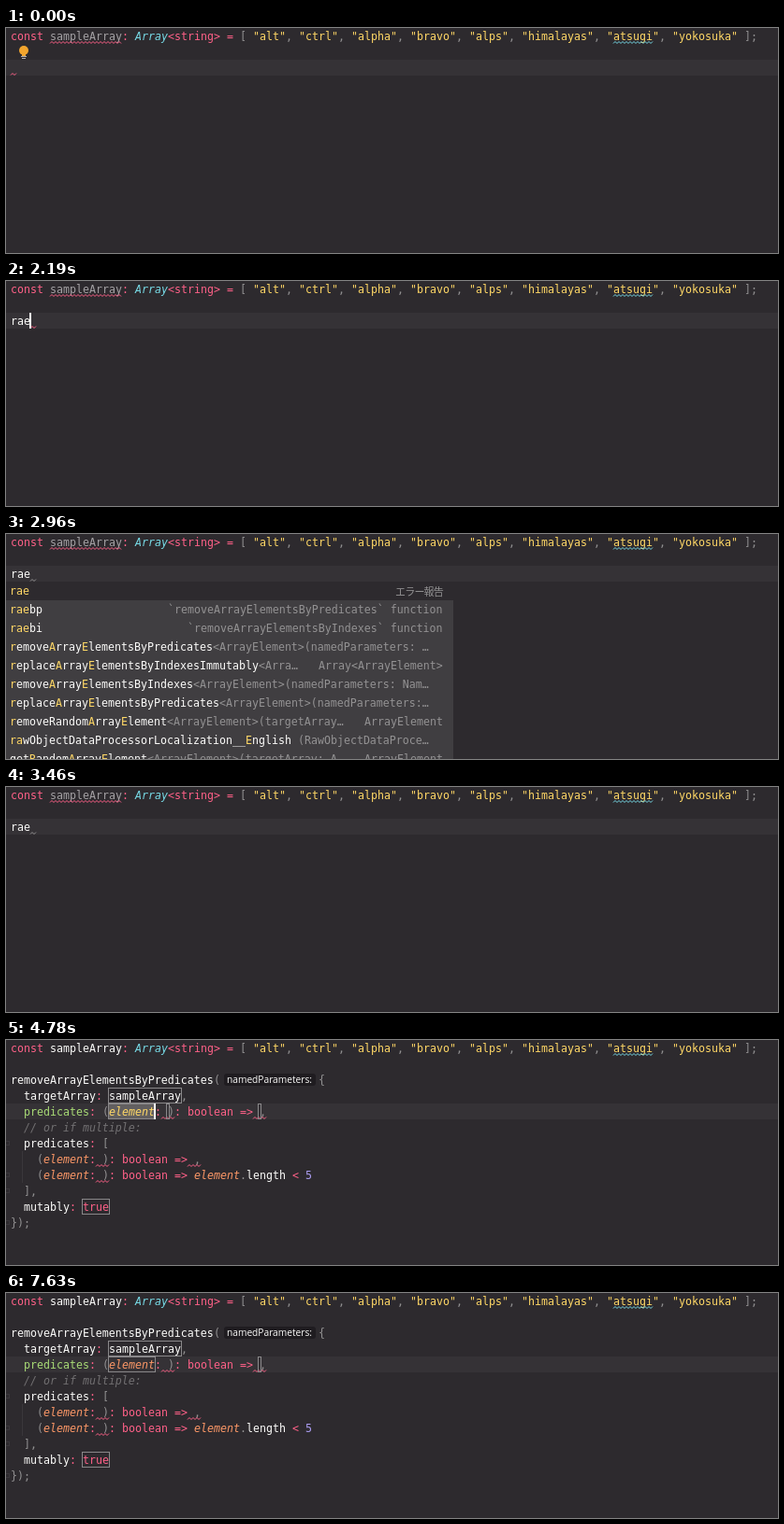
Recreate the animation shown at these times as an HTML page with a canvas. Size 825 px wide and 241 px high, loop 8 s.

```html
<!DOCTYPE html>
<html lang="en">
<head>
<meta charset="utf-8">
<title>Editor template expansion</title>
<style>
  html, body { margin: 0; width: 100%; height: 100%; overflow: hidden; background: #2d2a2e; }
  canvas { display: block; width: 825px; height: 241px; }
</style>
</head>
<body>
<canvas id="stage" width="825" height="241"></canvas>
<script>
const ctx = document.getElementById('stage').getContext('2d');
const W = 825, H = 241, LOOP = 8000;
const LEFT = 5, CELL = 7, LINE = 17, ROW = 20, POPUP_TOP = 51, POPUP_W = 478;
const MONO = '11.627px "DejaVu Sans Mono", monospace';
const UI = '"Open Sans", "Noto Sans", sans-serif';

const C = {
  bg: '#2d2a2e', line: '#353236', popup: '#403e41', select: '#625f60', box: '#8a888a', guide: '#3a373b',
  w: '#fcfcfa', g: '#939293', d: '#727072', u: '#a5a2a5', p: '#ff6188',
  c: '#78dce8', y: '#ffd866', o: '#fc9867', s: '#ffd866', n: '#a9dc76', v: '#ab9df2'
};
const ITALIC = 'cods';

const colX = col => LEFT + col * CELL;
const lineY = n => (n - 1) * LINE;

function rect(x, y, w, h, color) {
  ctx.fillStyle = color;
  ctx.fillRect(x, y, w, h);
}

function frame(x, y, w, h) {
  ctx.strokeStyle = C.box;
  ctx.lineWidth = 1;
  ctx.strokeRect(x + 0.5, y + 0.5, w - 1, h - 1);
}

function label(text, x, y, color, font, align = 'left') {
  ctx.font = font;
  ctx.fillStyle = color;
  ctx.textAlign = align;
  ctx.fillText(text, x, y);
}

// Runs are pairs: style key, text. Returns the x after the last run.
function runs(x, y, ...parts) {
  for (let i = 0; i < parts.length; i += 2) {
    const key = parts[i], text = parts[i + 1];
    label(text, x, y, C[key], (ITALIC.includes(key) ? 'italic ' : '') + MONO);
    x += text.length * CELL;
  }
  return x;
}

const code = (n, col, ...parts) => runs(colX(col), lineY(n) + 13, ...parts);

function wave(n, col, len, color) {
  const x0 = colX(col), y0 = lineY(n) + 16.5;
  ctx.beginPath();
  for (let x = 0; x <= len * CELL; x += 2) ctx.lineTo(x0 + x, y0 - (x % 4 ? 2 : 0));
  ctx.strokeStyle = color;
  ctx.lineWidth = 1;
  ctx.stroke();
}

function caret(n, col) {
  rect(Math.max(LEFT, colX(col) - 1), lineY(n), 2, LINE, C.w);
}

function declaration(t) {
  code(1, 0, 'p', 'const ', t < 3950 ? 'u' : 'w', 'sampleArray', 'p', ': ', 'c', 'Array', 'p', '<string> = ', 'g', '[ ');
  const words = ['alt', 'ctrl', 'alpha', 'bravo', 'alps', 'himalayas', 'atsugi', 'yokosuka'];
  let x = colX(37);
  words.forEach((word, i) => {
    x = runs(x, 13, 'y', `"${word}"`, 'g', i < words.length - 1 ? ', ' : ' ];');
  });
  if (t < 4270) wave(1, 6, 11, C.p);
  wave(1, 92, 6, C.c);
}

function bulb() {
  ctx.fillStyle = '#f2a52e';
  ctx.beginPath();
  ctx.arc(19, 24, 5, 0, Math.PI * 2);
  ctx.fill();
  rect(17, 27, 4, 3, '#f2a52e');
  rect(16, 30, 6, 1, '#b5b3b5');
  rect(17, 32, 4, 1, '#b5b3b5');
}

const args = '<ArrayElement>(';
// name, tail, right-hand note, matched letters
const ITEMS = [
  ['rae', '', '', 'rae'],
  ['raebp', '', '`removeArrayElementsByPredicates` function', 'rae'],
  ['raebi', '', '`removeArrayElementsByIndexes` function', 'rae'],
  ['removeArrayElementsByPredicates', args + 'namedParameters: …', '', 'rAE'],
  ['replaceArrayElementsByIndexesImmutably', '<Arra…', 'Array<ArrayElement>', 'rAE'],
  ['removeArrayElementsByIndexes', args + 'namedParameters: Nam…', '', 'rAE'],
  ['replaceArrayElementsByPredicates', args + 'namedParameters:…', '', 'rAE'],
  ['removeRandomArrayElement', args + 'targetArray…', 'ArrayElement', 'rAE'],
  ['rawObjectDataProcessorLocalization__English', ' (RawObjectDataProce…', '', 'raE'],
  ['getRandomArrayElement', args + 'targetArray: A…', 'ArrayElement', 'RAE']
];

function item([name, tail, note, match], y) {
  let x = 4, hit = 0;
  for (const ch of name) {
    const matched = ch === match[hit];
    if (matched) hit++;
    x = runs(x, y, matched ? 'y' : 'w', ch);
  }
  runs(x, y, 'g', tail);
  if (note) runs(467 - note.length * CELL, y, 'g', note);
}

function footer(top) {
  const y = top + 16;
  label('Press Ctrl+. to choose the selected (or first) suggestion and insert a dot afterwards', 344, y, C.y, '9.5px ' + UI, 'right');
  label('Next Tip', 350, y, C.y, '9.5px ' + UI);
  ctx.lineWidth = 1.6;
  for (let i = 0; i < 8; i++) {
    const a = i * Math.PI / 4, cos = Math.cos(a), sin = Math.sin(a);
    ctx.strokeStyle = `rgba(190,188,190,${0.25 + i * 0.06})`;
    ctx.beginPath();
    ctx.moveTo(450 + cos * 3, top + 12 + sin * 3);
    ctx.lineTo(450 + cos * 6.5, top + 12 + sin * 6.5);
    ctx.stroke();
  }
  for (const dy of [6, 11, 16]) rect(467, top + dy, 3, 3, '#c1c0c0');
}

function popup(t) {
  const full = t >= 2540;
  const count = full ? ITEMS.length : 4;
  const selected = t < 3140 ? 0 : 1;
  const bottom = POPUP_TOP + count * ROW;
  rect(0, POPUP_TOP, POPUP_W, full ? H - POPUP_TOP : count * ROW + 23, C.popup);
  rect(0, POPUP_TOP + selected * ROW, POPUP_W, ROW, C.bg);
  for (let i = 0; i < count; i++) item(ITEMS[i], POPUP_TOP + i * ROW + 14);
  ctx.letterSpacing = full ? '-0.8px' : '0px';
  label('エラー報告', 467, 66, C.g, `${full ? 11 : 12}px "Noto Sans CJK JP", "Noto Sans CJK", sans-serif`, 'right');
  ctx.letterSpacing = '0px';
  if (!full) footer(bottom);
}

function typing(t) {
  const typed = 'rae'.slice(0, t < 1920 ? 0 : t < 2060 ? 1 : t < 2190 ? 2 : 3);
  rect(0, lineY(3), W, LINE, C.line);
  code(3, 0, 'w', typed);
  wave(3, typed.length, 1, t < 2260 ? C.p : C.g);
  if (t < 940) bulb();
  else if (t < 2960 || t >= 3530) caret(3, typed.length);
  if (t >= 2330 && t < 3460) popup(t);
}

function lambda(n, col, style, ...tail) {
  code(n, col, 'g', '(', style, 'element', 'p', ': ', 'g', ')', 'p', ': boolean => ', ...tail);
}

function hint() {
  ctx.fillStyle = '#1f1c20';
  ctx.beginPath();
  ctx.roundRect(233, 36, 98, 13, 3);
  ctx.fill();
  label('namedParameters:', 236, 46, C.w, '10.2px ' + UI);
}

function template(t) {
  const ready = t >= 3950, waves = t >= 4020;
  const onFirst = t < 4780, onElement = !onFirst && t < 6490;
  const param = ready ? 'o' : 'w';
  rect(0, lineY(onFirst ? 4 : 5), W, LINE, C.line);
  if (onFirst) rect(110, lineY(4), 77, LINE, C.select);
  if (onElement) rect(110, lineY(5), 49, LINE, C.select);
  rect(17, lineY(8), 1, 2 * LINE, C.guide);

  code(3, 0, 'w', 'removeArrayElementsByPredicates', 'g', '(');
  if (ready) hint();
  runs(ready ? 334 : 229, lineY(3) + 13, 'g', '{');
  code(4, 2, 'w', 'targetArray', 'p', ': ', 'w', 'sampleArray', 'g', ',');
  code(5, 2, ready ? 'n' : 'w', 'predicates', 'p', ': ');
  lambda(5, 14, onElement ? 's' : param, 'g', ',');
  code(6, 2, 'd', '// or if multiple:');
  code(7, 2, 'w', 'predicates', 'p', ': ', 'g', '[');
  lambda(8, 4, param, 'g', ',');
  lambda(9, 4, param, param, 'element', 'g', '.', 'w', 'length ', 'p', '< ', 'v', '5');
  code(10, 2, 'g', '],');
  code(11, 2, 'w', 'mutably', 'p', ': true');
  code(12, 0, 'g', '});');

  if (waves) {
    wave(5, 23, 2, C.p);
    wave(5, 37, 2, C.p);
    wave(8, 13, 2, C.p);
    wave(8, 27, 2, C.p);
    wave(9, 13, 2, C.p);
  }
  if (t < 4270) wave(13, 0, 1, C.p);

  frame(109, lineY(4), 79, LINE);
  frame(109, lineY(5), 51, LINE);
  if (t < 6490) frame(171, lineY(5), 4, LINE);
  frame(269, lineY(5), 4, LINE);
  frame(81, lineY(11), 30, LINE);

  for (const n of [7, 9, 10, 12]) {
    rect(0, lineY(n) + 6, 4, 1, C.guide);
    rect(0, lineY(n) + 10, 4, 1, C.guide);
    rect(3, lineY(n) + 6, 1, 5, C.guide);
  }

  if (onFirst) caret(4, 26);
  else if (t < 6070) caret(5, 22);
  else if (t >= 6490 && t < 7630) caret(5, 24);
}

function draw(t) {
  rect(0, 0, W, H, C.bg);
  if (t < 3600) typing(t);
  else template(t);
  declaration(t);
}

const start = performance.now();
function tick() {
  draw((performance.now() - start) % LOOP);
  requestAnimationFrame(tick);
}
tick();
</script>
</body>
</html>
```
